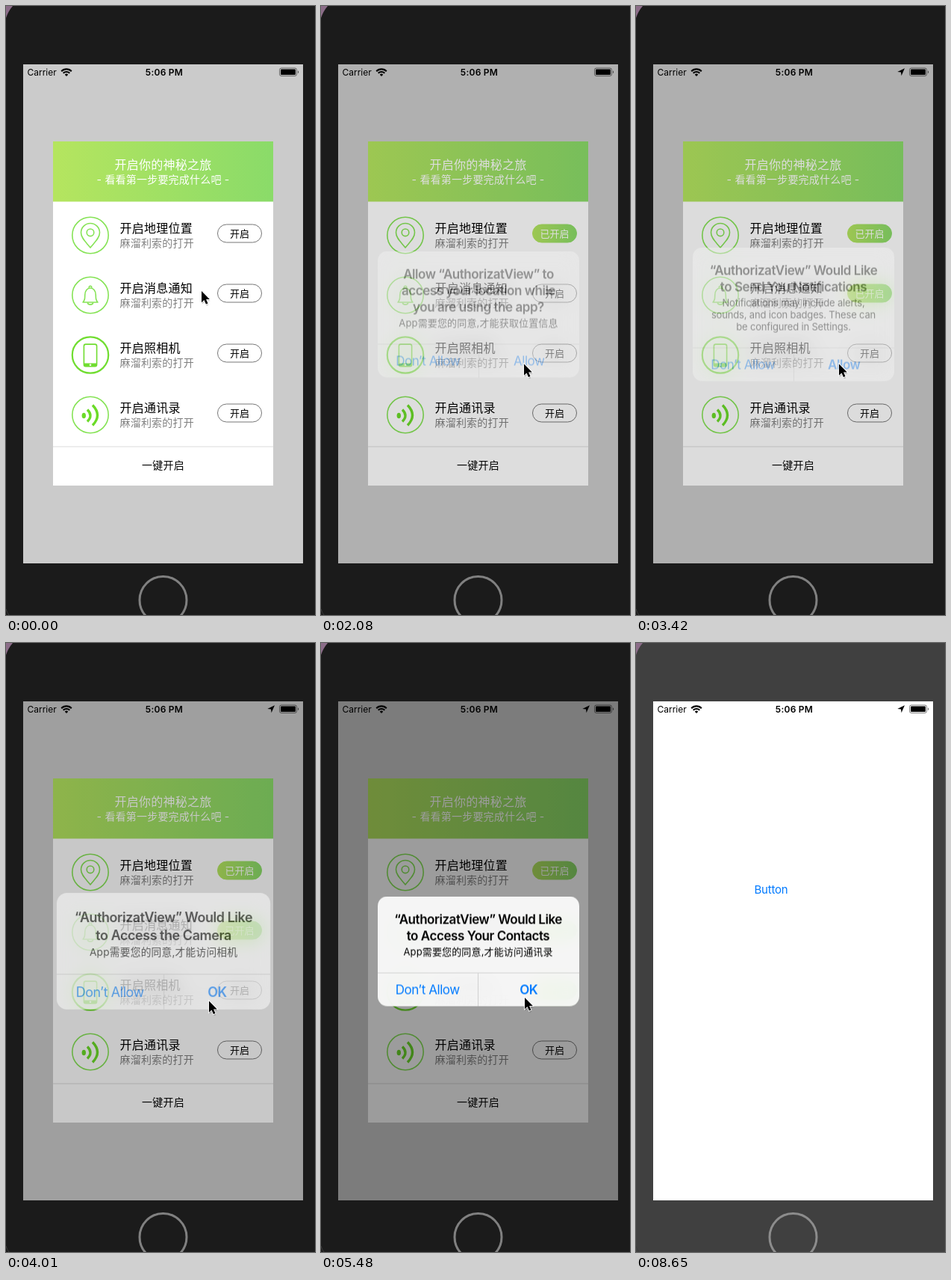
Recreate the animation shown at these times as an HTML page. Size 414 px wide and 814 px high, loop 8750 ms.

```html
<!DOCTYPE html>
<html lang="zh-CN">
<head>
<meta charset="utf-8">
<title>Permission prompts</title>
<style>
html, body { margin: 0; width: 100%; height: 100%; overflow: hidden; background: #1b1b1b; }
body, text { font-family: Inter, "Noto Sans CJK SC", "Noto Sans CJK", sans-serif; }
#stage { position: absolute; left: 0; top: 0; width: 414px; height: 814px; overflow: hidden; }
svg { position: absolute; left: 0; top: 0; display: block; }
.mid { text-anchor: middle; }
.t16 { font-size: 16px; letter-spacing: .25px; }
.t14 { font-size: 14px; letter-spacing: .2px; }
.t13 { font-size: 13px; }
.line { fill: none; stroke: #86e356; stroke-width: 1.6; stroke-linejoin: round; }
.bold { stroke: #70dd30; stroke-width: 2.2; }
.alert {
  position: absolute; left: 210.5px; top: 411.5px; width: 270px; overflow: hidden;
  border-radius: 13px; background: rgba(255, 255, 255, .9); text-align: center;
  -webkit-backdrop-filter: blur(12px) saturate(1.8);
  backdrop-filter: blur(12px) saturate(1.8);
}
.alert h1 { margin: 20px 0 2px; font: 600 17px/22px Inter, sans-serif; letter-spacing: -.45px; }
.alert p { margin: 0 0 20px; font-size: 13px; line-height: 16px; letter-spacing: .15px; }
.alert p.latin { letter-spacing: -.17px; }
.alert div { display: flex; border-top: 1px solid rgba(0, 0, 0, .14); }
.alert span { flex: 1 1 0; font-size: 17px; line-height: 44px; letter-spacing: -.45px; color: #007aff; }
.alert span + span { border-left: 1px solid rgba(0, 0, 0, .14); }
.alert .strong { font-weight: 600; }
.alert .down { background: rgba(0, 0, 0, .07); }
</style>
</head>
<body>
<div id="stage">
  <svg id="scene" width="414" height="814">
    <defs>
      <linearGradient id="green">
        <stop offset="0" stop-color="#b5e55f"/>
        <stop offset="1" stop-color="#8adb69"/>
      </linearGradient>
    </defs>
    <rect id="bezel" width="414" height="814"/>
    <path d="M0 0H9Q3 7 0 16Z" fill="#8b6c88"/>
    <path d="M0 806Q1.5 811 4 814" fill="none" stroke="#3a3a3a"/>
    <circle id="home" cx="210.5" cy="794" r="31.5" fill="none" stroke-width="3"/>
    <rect x="23" y="78" width="375" height="667" fill="#fff"/>
    <text class="mid" x="181" y="334.5" font-size="15" letter-spacing="-.2" fill="#007aff">Button</text>
    <rect id="mask" x="23" y="78" width="375" height="667"/>
    <g id="card">
      <rect x="63" y="181" width="295" height="460" fill="#fff"/>
      <rect x="63" y="181" width="295" height="80.5" fill="url(#green)"/>
      <g class="mid" fill="#fff">
        <text class="t16" x="210.5" y="217.5">开启你的神秘之旅</text>
        <text class="t14" x="210.5" y="236.7">- 看看第一步要完成什么吧 -</text>
      </g>
      <g id="rows"></g>
      <rect x="63" y="588.5" width="295" height="1" fill="#dcdcdc"/>
      <text class="t14 mid" x="210.5" y="619">一键开启</text>
    </g>
    <rect id="dim" x="23" y="78" width="375" height="667"/>
  </svg>
  <div id="alerts"></div>
  <svg width="414" height="814">
    <text x="28.5" y="92.6" font-size="12">Carrier</text>
    <text class="mid" x="212" y="92.6" font-size="12" font-weight="600" letter-spacing=".25">5:06 PM</text>
    <g fill="none" stroke="#000" stroke-width="2.1">
      <path d="M74.2 87.2A9.6 9.6 0 0 1 87.8 87.2"/>
      <path d="M76.7 89.8A6.1 6.1 0 0 1 85.3 89.8"/>
    </g>
    <path d="M78.8 91.7A3.1 3.1 0 0 1 83.2 91.7L81 94Z"/>
    <path id="arrow" d="M360 83.3L350.3 87.9L355 88.4L355.6 93.2Z"/>
    <rect x="366.5" y="83" width="23" height="10.5" rx="2.4" fill="none" stroke="#000" stroke-opacity=".5"/>
    <rect x="368" y="84.5" width="20" height="7.5" rx="1"/>
    <path d="M391 86.3Q393.4 88.2 391 90.2Z" fill-opacity=".6"/>
    <g id="cursor">
      <path d="M0 1V16.2L3.5 13L5.9 18.6L8.5 17.5L6.1 12H10.8Z" fill-opacity=".2" transform="translate(.8 1.2)"/>
      <path d="M0 0V15.2L3.5 12L5.9 17.6L8.5 16.5L6.1 11H10.8Z" stroke="#fff" stroke-width="1.6" paint-order="stroke"/>
    </g>
  </svg>
</div>
<script>
const LOOP = 8750, TICK = 147.6;
const $ = id => document.getElementById(id);

// Icons are drawn around the centre of their ring.
const rows = [
  { name: '开启地理位置', on: 14, ring: 'line', icon: `
    <path class="line" d="M0 16.5C-5 10-12.5 4-12.5-3.5A12.5 12.5 0 0 1 12.5-3.5C12.5 4 5 10 0 16.5Z"/>
    <circle class="line" cy="-3.7" r="4.8"/>` },
  { name: '开启消息通知', on: 23, ring: 'line', icon: `
    <path class="line" d="M-10 9.5C-7 7-7.3 4-7.3 0C-7.3-6-4-9.5 0-9.5C4-9.5 7.3-6 7.3 0C7.3 4 7 7 10 9.5Z"/>
    <path class="line" d="M-1.7-9.8A1.8 1.8 0 1 1 1.7-9.8M-3.8 10A3.9 3.4 0 0 0 3.8 10"/>` },
  { name: '开启照相机', on: 32, ring: 'line bold', icon: `
    <rect x="-8.6" y="-14.4" width="17.2" height="29.6" rx="2.4" fill="none" stroke="#70dd30" stroke-width="1.6"/>
    <path d="M-8.6 11H8.6V13.5Q8.6 15.2 6.5 15.2H-6.5Q-8.6 15.2-8.6 13.5Z" fill="#70dd30"/>
    <circle cy="13.2" r="1.3" fill="#fff"/>` },
  { name: '开启通讯录', on: 40, ring: 'line', icon: `
    <ellipse cx="-8.7" cy="1" rx="2.7" ry="3.8" fill="#6bdb28"/>
    <path d="M-4-7Q4 1-4 9M3-13Q16 .5 3 14" fill="none" stroke="#6bdb28" stroke-width="3.3"/>` }
];

$('rows').innerHTML = rows.map((r, i) => `
  <g transform="translate(0 ${i * 80})">
    <g transform="translate(113 306.5)"><circle class="${r.ring}" r="24.2"/>${r.icon}</g>
    <text class="t16" x="152.5" y="302.5">${r.name}</text>
    <text class="t14" x="152.5" y="322" fill="#808080">麻溜利索的打开</text>
    <rect class="pill" x="283.5" y="292" width="59" height="24" rx="12"/>
    <text class="t13 mid label" x="313" y="308.8"></text>
  </g>`).join('');
const pills = [...document.querySelectorAll('.pill')];
const labels = [...document.querySelectorAll('.label')];

// Ticks: show = first visible, press = button held, hide = fade begins at opacity "fade".
const alerts = [
  { show: 7, press: 13, hide: 14, fade: .34, ok: 'Allow',
    title: 'Allow “AuthorizatView” to<br>access your location while<br>you are using the app?',
    text: 'App需要您的同意,才能获取位置信息' },
  { show: 18, press: 22, hide: 23, fade: .35, ok: 'Allow', strong: true, latin: true,
    title: '“AuthorizatView” Would Like<br>to Send You Notifications',
    text: 'Notifications may include alerts,<br>sounds, and icon badges. These can<br>be configured in Settings.' },
  { show: 27, press: 31, hide: 32, fade: .54, ok: 'OK', strong: true,
    title: '“AuthorizatView” Would Like<br>to Access the Camera',
    text: 'App需要您的同意,才能访问相机' },
  { show: 36, press: 39, hide: 40, fade: .54, ok: 'OK', strong: true,
    title: '“AuthorizatView” Would Like<br>to Access Your Contacts',
    text: 'App需要您的同意,才能访问通讯录' }
];

for (const a of alerts) {
  a.box = document.createElement('section');
  a.box.className = 'alert';
  a.box.innerHTML = `<h1>${a.title}</h1><p class="${a.latin ? 'latin' : ''}">${a.text}</p>
    <div><span>Don’t Allow</span><span class="${a.strong ? 'strong' : ''}">${a.ok}</span></div>`;
  a.button = a.box.querySelector('span + span');
  $('alerts').append(a.box);
}

// Cursor stops: tick, x, y
const path = [
  [0, 262, 381], [4, 227.5, 622], [9, 227.5, 622], [13, 272, 478.5], [28, 272, 478.5],
  [31, 273, 467], [35, 273, 467], [37, 273, 474], [40, 273, 474], [44, 270.5, 486],
  [51, 247.5, 757.5], [53, 296, 801], [54, 310, 840]
];

function cursorAt(n) {
  const i = path.findIndex(p => p[0] > n);
  if (i < 0) return path[path.length - 1].slice(1);
  const [n0, x0, y0] = path[i - 1], [n1, x1, y1] = path[i];
  const u = (n - n0) / (n1 - n0), e = u * u * (3 - 2 * u);
  return [x0 + (x1 - x0) * e, y0 + (y1 - y0) * e];
}

function alertLevel(a, n) {
  if (n < a.show) return 0;
  if (n === a.show) return .55;
  if (n < a.hide) return 1;
  return n === a.hide ? a.fade : n === a.hide + 1 ? a.fade * .15 : 0;
}

function draw(n, idle) {
  $('bezel').setAttribute('fill', idle ? '#404040' : '#1b1b1b');
  $('home').setAttribute('stroke', idle ? '#8c8c8c' : '#808080');
  $('arrow').style.display = n >= 15 ? '' : 'none';

  rows.forEach((r, i) => {
    const on = n >= r.on;
    pills[i].setAttribute('fill', on ? 'url(#green)' : 'none');
    pills[i].setAttribute('stroke', on ? 'url(#green)' : '#777');
    labels[i].setAttribute('fill', on ? '#fff' : '#000');
    labels[i].textContent = on ? '已开启' : '开启';
  });

  const [scale, alpha] = n < 43 ? [1, 1] : n < 44 ? [.68, .66] : n < 45 ? [.163, .08] : [0, 0];
  $('card').setAttribute('transform', `translate(210.5 411) scale(${scale}) translate(-210.5 -411)`);
  $('card').setAttribute('opacity', alpha);
  $('mask').setAttribute('opacity', .203 * alpha);

  let dim = 0;
  for (const a of alerts) {
    const level = alertLevel(a, n);
    dim = Math.max(dim, level);
    a.box.style.display = level ? '' : 'none';
    a.box.style.opacity = level;
    a.box.style.transform = `translate(-50%, -50%) scale(${n === a.show ? 1.06 : 1})`;
    a.button.classList.toggle('down', n === a.press);
  }
  $('dim').setAttribute('opacity', .39 * dim);

  const [x, y] = cursorAt(n);
  $('cursor').setAttribute('transform', `translate(${x.toFixed(1)} ${y.toFixed(1)})`);
}

function loop() {
  const t = performance.now() % LOOP;
  draw(Math.floor((t + 3) / TICK), t >= 8650);
  requestAnimationFrame(loop);
}
loop();
</script>
</body>
</html>
```
